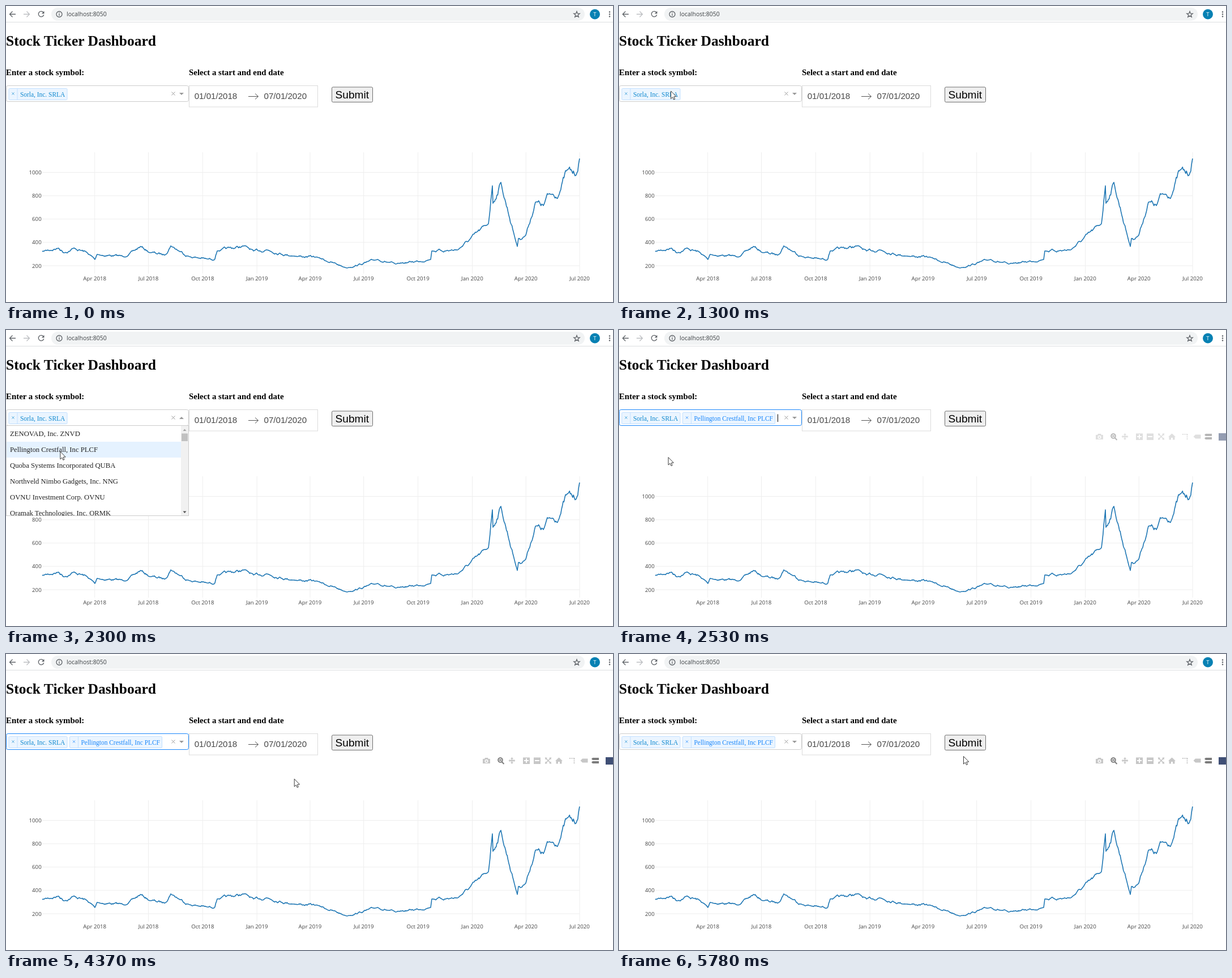
Write an HTML page that moves like this. It is 1072x522 px and loops after 8 s.

```html
<!DOCTYPE html>
<html lang="en">
<head>
<meta charset="utf-8">
<title>Stock Ticker Dashboard</title>
<style>
  html, body { margin: 0; width: 100%; height: 100%; overflow: hidden; background: #fff; }
  svg { display: block; }
  text { font-family: "Liberation Serif", Times, serif; white-space: pre; }
  .url { font: 10.5px "Open Sans", sans-serif; fill: #3c4043; }
  .head { font-weight: bold; font-size: 14.9px; }
  .chip { font-size: 11.42px; }
  .option { font-size: 12.69px; fill: #222; }
  .date { font: 15.1px "Liberation Sans", Arial, sans-serif; fill: #484848; }
  .tick { font: 9.7px "Open Sans", sans-serif; fill: #444; }
  .tip { font: 10.3px "Liberation Sans", Arial, sans-serif; fill: #fff; }
  .icon { fill: none; stroke: #5f6368; stroke-width: 1.3; }
  .grid { stroke: #eee; }
</style>
</head>
<body>
<svg width="1072" height="522" viewBox="0 0 1072 522">
  <!-- browser bar -->
  <rect x="80" y="3" width="942" height="23" rx="11.5" fill="#f1f3f4"/>
  <path d="M0 28.5H1072" stroke="#dcdee1"/>
  <path class="icon" d="M17 14.5H6.5M11.5 9.5l-5 5 5 5"/>
  <path class="icon" style="stroke:#bcbec1" d="M31 14.5H41.5M36.5 9.5l5 5-5 5"/>
  <path class="icon" d="M66 11.2A4.8 4.8 0 1 0 66.8 15.5"/>
  <path d="M67.5 9v4.6h-4.6z" fill="#5f6368"/>
  <circle class="icon" cx="94" cy="14.5" r="5"/>
  <path class="icon" d="M94 13.7v3.6M94 11.5v1.3"/>
  <text class="url" x="107" y="18">localhost:8050</text>
  <path id="star" class="icon"/>
  <circle cx="1040" cy="14.5" r="9" fill="#0781b3"/>
  <text class="url" style="font-size:9.5px;fill:#fff" x="1040" y="18" text-anchor="middle">T</text>
  <path d="M1066 10.5h.01m0 4h.01m0 4h.01" stroke="#5f6368" stroke-width="2.6" stroke-linecap="round"/>

  <!-- page -->
  <text x="0" y="69.5" font-size="25.5" font-weight="bold">Stock Ticker Dashboard</text>
  <text class="head" x="0" y="122">Enter a stock symbol:</text>
  <text class="head" x="323" y="122">Select a start and end date</text>

  <g id="chart"></g>
  <path id="line" fill="none" stroke="#1f77b4" stroke-width="1.6" stroke-linejoin="round"/>
  <g id="bar" fill="#c7c7c7" stroke="#c7c7c7" stroke-width="0"></g>

  <g id="hover">
    <path id="dateBox" fill="#444" stroke="#fff"/>
    <text id="dateText" class="tip" y="490" text-anchor="middle"></text>
    <path id="valueBox" fill="#1f77b4" stroke="#fff"/>
    <text id="valueText" class="tip"></text>
  </g>

  <rect x="323.5" y="140.5" width="227" height="37.5" fill="#fff" stroke="#dbdbdb"/>
  <text class="date" x="332.7" y="164">01/01/2018</text>
  <path d="M428 159.5H445M440 154.5l5.5 5-5.5 5" fill="none" stroke="#555"/>
  <text class="date" x="455.5" y="164">07/01/2020</text>

  <rect id="button" x="575.5" y="143" width="72" height="26.5" rx="2" stroke="#707070"/>
  <text class="date" style="font-size:19.1px;fill:#000" x="611.3" y="163" text-anchor="middle">Submit</text>

  <rect id="control" x=".5" y="140.5" width="322" height="28" rx="3" fill="#fff"/>
  <g id="chipA"></g>
  <g id="chipB"></g>
  <path id="caret" d="M280.5 148.5V162" stroke="#000"/>
  <path d="M292.5 151.5l6 6m0-6l-6 6" stroke="#999"/>
  <path id="arrow" fill="#999"/>

  <g id="menu">
    <rect x=".5" y="168.5" width="322" height="159" fill="#fff" stroke="#ccc"/>
    <rect id="focus" x="1" width="308" height="28" fill="#e5f2ff"/>
    <clipPath id="clip"><rect x="1" y="169" width="308" height="158"/></clipPath>
    <g id="options" clip-path="url(#clip)"></g>
    <rect x="309" y="169" width="13" height="158" fill="#f1f1f1"/>
    <rect x="310" y="182.5" width="11" height="13.5" fill="#c1c1c1"/>
    <path d="M312.5 178l3-3.5 3 3.5z" fill="#a3a3a3"/>
    <path d="M312.5 319.5l3 3.5 3-3.5z" fill="#505050"/>
  </g>

  <path id="cursor" d="M0 0V13.5L3 10.7 5 15 7.1 14.2 5.2 9.9 9.3 9.6z" fill="#fff" stroke="#222" stroke-width=".9"/>
</svg>
<script>
const el = id => document.getElementById(id);
const set = (id, attrs) => { for (const k in attrs) el(id).setAttribute(k, attrs[k]); };
const show = (id, on) => { el(id).style.display = on ? '' : 'none'; };
const clamp = v => Math.max(0, Math.min(1, v));
const lerp = (a, b, f) => a + (b - a) * f;
const repeat = (n, make) => Array.from({ length: n }, (_, i) => make(i)).join('');

const LOOP = 8000, OPEN = 1530, PICK = 2365, CLICK = 5000;
const LEFT = 64, DAY = 949 / 911, ZERO_Y = 458, UNIT = 0.2056;
const priceAt = y => 200 + (ZERO_Y - y) / UNIT;

// axes
const start = Date.UTC(2018, 0, 2);
const month = d => d.toLocaleString('en-US', { month: 'short', timeZone: 'UTC' });
const yTick = i => {
  const y = ZERO_Y - i * 200 * UNIT;
  return `<path class="grid" d="M64 ${y}H1013"/><text class="tick" x="62.7" y="${y + 3.5}" text-anchor="end">${200 + i * 200}</text>`;
};
const xTick = i => {
  const d = new Date(Date.UTC(2018, 3 + 3 * i, 1)), x = LEFT + (d - start) / 864e5 * DAY;
  return `<path class="grid" d="M${x} 258V472"/><text class="tick" x="${x}" y="483.5" text-anchor="middle">${month(d)} ${d.getUTCFullYear()}</text>`;
};
el('chart').innerHTML = repeat(5, yTick) + repeat(10, xTick);

// price curve: a few turning points joined by seeded noise in proportion to the price
const knots = [
  [64,433], [93,427], [104,435], [121,427], [143.17,434.652], [157,447], [161,438], [213,442],
  [238,424], [255,435], [281,439], [291,423], [324,442], [355,446], [369,446], [373,432],
  [423,423], [437,432], [460,430], [508,441], [550,443], [602,462], [656,447], [688,455],
  [750,447], [752,432], [798,430], [852,384], [859,317], [860,348], [874,311], [903,424],
  [905,410], [918,404], [935,346], [949,352], [957,332], [977,332], [991,289], [1007,298], [1013,269]
];
let seed = 7;
const rand = () => (seed = seed * 16807 % 2147483647) / 2147483647;
const prices = [];
knots.forEach(([x, y], i) => {
  prices.push([x, y]);
  const [nx, ny] = knots[i + 1] || [x, y];
  let drift = 0;
  for (let px = x + 1.4; px < nx - 0.7; px += 1.4) {
    const f = (px - x) / (nx - x), base = lerp(y, ny, f);
    drift = drift * 0.8 + (rand() - 0.5) * priceAt(base) / 100;
    prices.push([px, base + drift * Math.min(1, 6 * f * (1 - f))]);
  }
});
set('line', { d: 'M' + prices.map(p => p.map(v => v.toFixed(2))).join('L') });

// piecewise linear lookup in rows [key, values...]
function sample(rows, key) {
  let i = 1;
  while (i < rows.length - 1 && rows[i][0] < key) i++;
  const a = rows[i - 1], b = rows[i], f = clamp((key - a[0]) / (b[0] - a[0]));
  return a.slice(1).map((v, k) => lerp(v, b[k + 1], f));
}

// toolbar icons, each drawn around its own centre
const icon = (x, body) => `<g transform="translate(${x} 188)">${body}</g>`;
const spin = (d, turn = 0) => repeat(4, i => `<path d="${d}" transform="rotate(${i * 90 + turn})"/>`);
const box = '<rect x="-6" y="-5.5" width="12" height="11.5"/>';
const sign = d => `<path d="${d}" stroke="#fff" stroke-width="2"/>`;
const pointer = 'M-2.5 -3L0 -6L2.5 -3H1V0H-1V-3z';
const tag = (y, h) => `<path d="M-6.500 ${y + h / 2}l${h / 2} ${-h / 2}H6.500v${h}H${h / 2 - 6.5}z"/>`;
el('bar').innerHTML =
  icon(848.5, '<path d="M-6.500-3h3l1-2h5l1 2h3v8h-13z"/><circle cy="1" r="2.3" fill="none" stroke="#fff" stroke-width="1.4"/>') +
  icon(874, '<g fill="none" stroke="#7c7c7c" stroke-width="2"><circle cx="-1" cy="-1" r="3.800"/><path d="M1.500 2l4 4M-3-1h4"/></g>') +
  icon(893.5, spin(pointer)) +
  icon(919, box + sign('M-4 0H4M0-4V4')) +
  icon(938, box + sign('M-4 0H4')) +
  icon(957.5, spin('M-2.500-4.500L0-8L2.500-4.500H.8V0H-.8V-4.500z', 45)) +
  icon(976.5, '<path d="M0-5.500L6.500 .5H5v5H1.500V2h-3v3.500H-5v-5h-1.500z"/>') +
  icon(1000, '<path d="M-5-4H5M3.500-4V5" stroke-width="2" stroke-dasharray="2 1.5"/>') +
  icon(1021, tag(-3.5, 7)) +
  icon(1040.5, `<g fill="#7c7c7c">${tag(-5, 4)}${tag(1, 4)}</g>`) +
  '<rect x="1059" y="182" width="13" height="13" fill="#3f4f75"/>';
set('star', { d: 'M' + Array.from({ length: 10 }, (_, i) => {
  const r = i % 2 ? 2.3 : 5.5, a = i * Math.PI / 5;
  return [1008 + r * Math.sin(a), 15 - r * Math.cos(a)];
}).join('L') + 'z' });

// select control
const names = ['ZENOVAD, Inc. ZNVD', 'Pellington Crestfall, Inc PLCF', 'Quoba Systems Incorporated QUBA',
  'Northveld Nimbo Gadgets, Inc. NNG', 'OVNU Investment Corp. OVNU', 'Oramak Technologies, Inc. ORMK'];
el('options').innerHTML = repeat(names.length, i => `<text class="option" x="7" y="${187 + 28 * i}">${names[i]}</text>`);
const chip = (x, w, color, name) =>
  `<rect x="${x}" y="145.5" width="${w}" height="20" rx="1.5" fill="#ebf5ff" stroke="#c2e0ff"/>
   <path d="M${x + 15} 145.5v20" stroke="#c2e0ff"/>
   <path d="M${x + 5.5} 152.5l4 4m0-4l-4 4" stroke="${color}" stroke-width=".8"/>
   <text class="chip" x="${x + 20}" y="159.5" fill="${color}">${name}</text>`;
el('chipA').innerHTML = chip(5, 103, '#1089cf', 'Sorla, Inc. SRLA');
el('chipB').innerHTML = chip(112.5, 163, '#1a87fb', names[1]);

// pointer stops: time, x, y
const stops = [
  [350,811,504], [520,163,310], [750,132.5,233.5], [1050,88,150], [OPEN,95,150], [1910,111,197],
  [2530,87,224.5], [3220,146,240], [3450,184.5,243.5], [3610,222,250], [4220,226,249],
  [4370,509,220.5], [4850,611,155], [5240,611,155], [5780,608.5,180.5]
];
const barTimes = [[350, 950], [PICK, 4550], [5450, 9000]];
const fade = (t, from) => clamp((t - from) / 300);

// labels trail the pointer and snap to weekdays
function drawHover(t) {
  const [mx, my] = sample(stops, t - 80);
  const on = t >= 430 && my > 258 && my < 472;
  show('hover', on);
  if (!on) return;
  let day = Math.round((mx - LEFT) / DAY);
  if (day % 7 === 4) day--;
  if (day % 7 === 5) day++;
  const x = LEFT + day * DAY, [y] = sample(prices, x);
  const d = new Date(start + day * 864e5);
  el('dateText').textContent = `${month(d)} ${d.getUTCDate()}, ${d.getUTCFullYear()}`;
  set('dateText', { x });
  set('dateBox', { d: `M${x} 473l5 5h28v16.5h-66v-16.5h28z` });
  el('valueText').textContent = priceAt(y).toFixed(2);
  set('valueText', { x: x + 8, y: y + 3.7 });
  set('valueBox', { d: `M${x + 1} ${y}l5-5v-3.5h36.5v17h-36.5v-3.5z` });
}

function draw(t) {
  const [mx, my] = sample(stops, t);
  show('cursor', t >= 210);
  set('cursor', { transform: `translate(${mx} ${my})` });
  set('bar', { opacity: barTimes.reduce((sum, [a, b]) => sum + fade(t, a) - fade(t, b), 0) });
  drawHover(t);

  const open = t >= OPEN && t < PICK, focused = t >= PICK && t < CLICK;
  show('menu', open);
  set('focus', { y: my > 198 ? 197 : 169 });
  set('arrow', { d: open ? 'M306 157l4-4 4 4z' : 'M306 153l4 4 4-4z' });
  show('chipB', t >= PICK);
  show('caret', focused && Math.floor((t - PICK) / 530) % 2 === 0);
  set('control', { stroke: focused ? '#1a87fb' : '#ccc' });

  const over = mx > 575 && mx < 648 && my > 143 && my < 170;
  const pressed = t >= CLICK && t < CLICK + 70;
  set('button', { fill: pressed ? '#f5f5f5' : over ? '#e5e5e5' : '#efefef' });
}

const began = performance.now();
function tick() {
  draw((performance.now() - began) % LOOP);
  requestAnimationFrame(tick);
}
tick();
</script>
</body>
</html>
```
